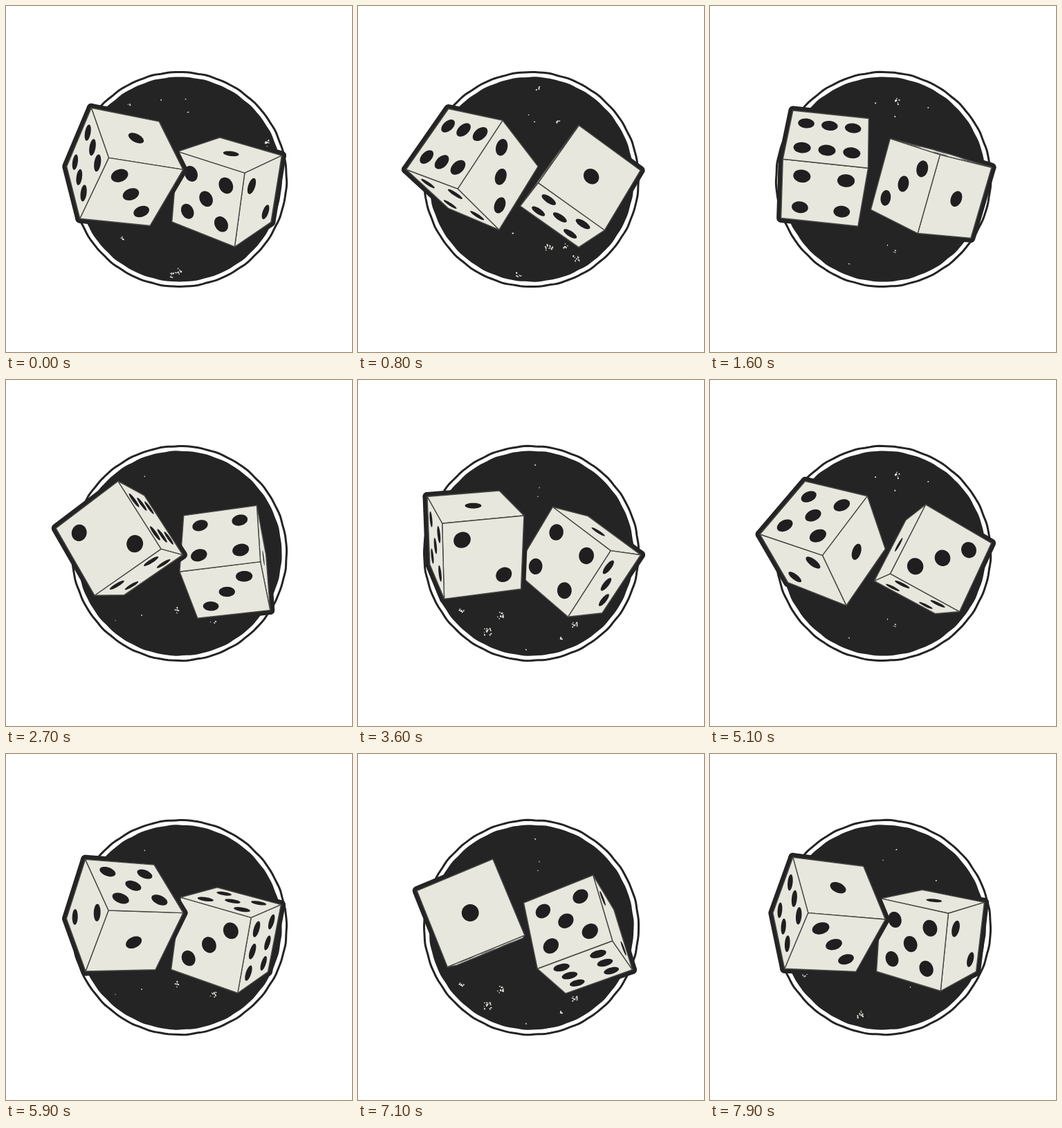
These frames come from a looping animation (500 by 500 pixels, 8000 ms). An HTML page with a canvas:

```html
<!DOCTYPE html>
<html>
<head>
<meta charset="utf-8">
<title>Rolling dice</title>
<style>
html, body { margin: 0; width: 100%; height: 100%; overflow: hidden; background: #fff; }
canvas { display: block; width: 500px; height: 500px; }
</style>
</head>
<body>
<canvas id="stage" width="500" height="500"></canvas>
<script>
const ctx = document.getElementById('stage').getContext('2d');
const INK = '#242424', BONE = '#e7e7dd', PIP = '#211e20', SEAM = '#484846';
const TICK = 100, TICKS = 80, LOOK_TICKS = 4, LOOKS = 8;
const CENTRE = 250.5, DISC = 148, CAMERA = 750, PIP_RADIUS = 0.104, TAU = Math.PI * 2;

// a and c are the starting directions of two face normals;
// faces holds the values on +a, -a, +b, -b, +c, -c
const DICE = [
  { x: 319, y: 264, size: 107, a: [0.118, -0.925, 0.364], c: [0.528, -0.26, -0.809],
    faces: [1, 6, 3, 2, 4, 5] },
  { x: 166.5, y: 234, size: 111, a: [0.372, -0.746, 0.551], c: [-0.898, -0.136, 0.422],
    faces: [1, 4, 3, 2, 6, 5] }
];

const cross = (a, b) => [
  a[1] * b[2] - a[2] * b[1], a[2] * b[0] - a[0] * b[2], a[0] * b[1] - a[1] * b[0]];
const mix = (vectors, weights) =>
  [0, 1, 2].map(i => vectors.reduce((sum, v, k) => sum + v[i] * weights[k], 0));
const unit = v => v.map(n => n / Math.hypot(...v));

function seeded(seed) {
  let s = seed * 7654321 + 99991;
  return () => (s = (s * 16807) % 2147483647) / 2147483647;
}

// Pip centres on a unit face: one or two diagonals, a middle pip, or two rows
function pips(value) {
  const d = 0.265;
  if (value === 6) return [-0.25, 0.25].flatMap(u => [-0.3, 0, 0.3].map(v => [u, v]));
  const spots = value % 2 ? [[0, 0]] : [];
  if (value > 2) spots.push([d, d], [-d, -d]);
  if (value === 2 || value > 3) spots.push([d, -d], [-d, d]);
  return spots;
}

function trace(points) {
  ctx.beginPath();
  points.forEach(q => ctx.lineTo(q[0], q[1]));
  ctx.closePath();
}

const ring = (n, place) => trace(Array.from({ length: n }, (_, i) => place(i / n * TAU)));

// Slightly uneven hand-drawn circle
const roughCircle = (r, phase) => ring(180, a => {
  const d = r + 0.2 * Math.sin(a * 23 + phase) + 0.2 * Math.sin(a * 37 - phase);
  return [CENTRE + d * Math.cos(a), CENTRE + d * Math.sin(a)];
});

function drawDisc(look) {
  roughCircle(155, look * 1.7);
  ctx.strokeStyle = INK;
  ctx.lineWidth = 3;
  ctx.stroke();
  roughCircle(DISC, look * 2.3);
  ctx.fillStyle = INK;
  ctx.fill();
  drawWear(seeded(look + 1));
}

// Worn spots: small loose clusters of specks near the rim
function drawWear(rnd) {
  ctx.fillStyle = BONE;
  for (let i = 0; i < 14; i++) {
    const a = rnd() * TAU, d = DISC * (0.55 + 0.4 * rnd());
    const count = 1 + Math.floor(14 * rnd() ** 4), spread = Math.sqrt(count) * 2;
    for (let k = 0; k < count; k++) {
      const x = CENTRE + d * Math.cos(a) + (rnd() + rnd() - 1) * spread;
      const y = CENTRE + d * Math.sin(a) + (rnd() + rnd() - 1) * spread;
      ctx.beginPath();
      ctx.ellipse(x, y, 0.5 + rnd(), 0.5 + rnd() * 0.7, rnd() * 3, 0, TAU);
      ctx.fill();
    }
  }
}

// The die spins about its own c axis while turning about the fixed b axis
function axesAt(die, turn) {
  const c = unit(die.c), b = unit(cross(c, die.a)), base = [cross(b, c), b, c];
  const cos = Math.cos(turn), sin = Math.sin(turn);
  return [
    mix(base, [cos * cos, -sin, -sin * cos]),
    mix(base, [sin * cos, cos, -sin * sin]),
    mix(base, [sin, 0, cos])
  ];
}

function visibleFaces(die, turn) {
  const axes = axesAt(die, turn);
  return die.faces.flatMap((value, i) => {
    const k = i >> 1, side = i % 2 ? -0.5 : 0.5;
    if (axes[k][2] * side * 2 * CAMERA <= die.size / 2) return [];
    const [u, v] = axes.filter((_, j) => j !== k);
    const at = (s, t) => {
      const q = mix([axes[k], u, v], [side, s, t]);
      const scale = die.size * CAMERA / (CAMERA - q[2] * die.size);
      return [die.x + q[0] * scale, die.y + q[1] * scale];
    };
    return [{ value, at, quad: [at(-0.5, -0.5), at(0.5, -0.5), at(0.5, 0.5), at(-0.5, 0.5)] }];
  });
}

function drawDie(die, turn) {
  const faces = visibleFaces(die, turn);
  ctx.lineJoin = 'round';
  ctx.strokeStyle = INK;
  ctx.lineWidth = 13;
  for (const { quad } of faces) {
    trace(quad);
    ctx.stroke();
  }
  ctx.strokeStyle = SEAM;
  ctx.lineWidth = 1.4;
  for (const { value, at, quad } of faces) {
    trace(quad);
    ctx.fillStyle = BONE;
    ctx.fill();
    ctx.stroke();
    ctx.fillStyle = PIP;
    for (const [s, t] of pips(value)) {
      ring(32, a => at(s + PIP_RADIUS * Math.cos(a), t + PIP_RADIUS * Math.sin(a)));
      ctx.fill();
    }
  }
}

function draw(time) {
  const tick = Math.floor(time / TICK) % TICKS;
  ctx.fillStyle = '#fff';
  ctx.fillRect(0, 0, 500, 500);
  drawDisc(Math.floor(tick / LOOK_TICKS) % LOOKS);
  for (const die of DICE) drawDie(die, tick / TICKS * TAU);
}

let start;
function loop(now) {
  start ??= now;
  draw(now - start);
  requestAnimationFrame(loop);
}
draw(0);
requestAnimationFrame(loop);
</script>
</body>
</html>
```
